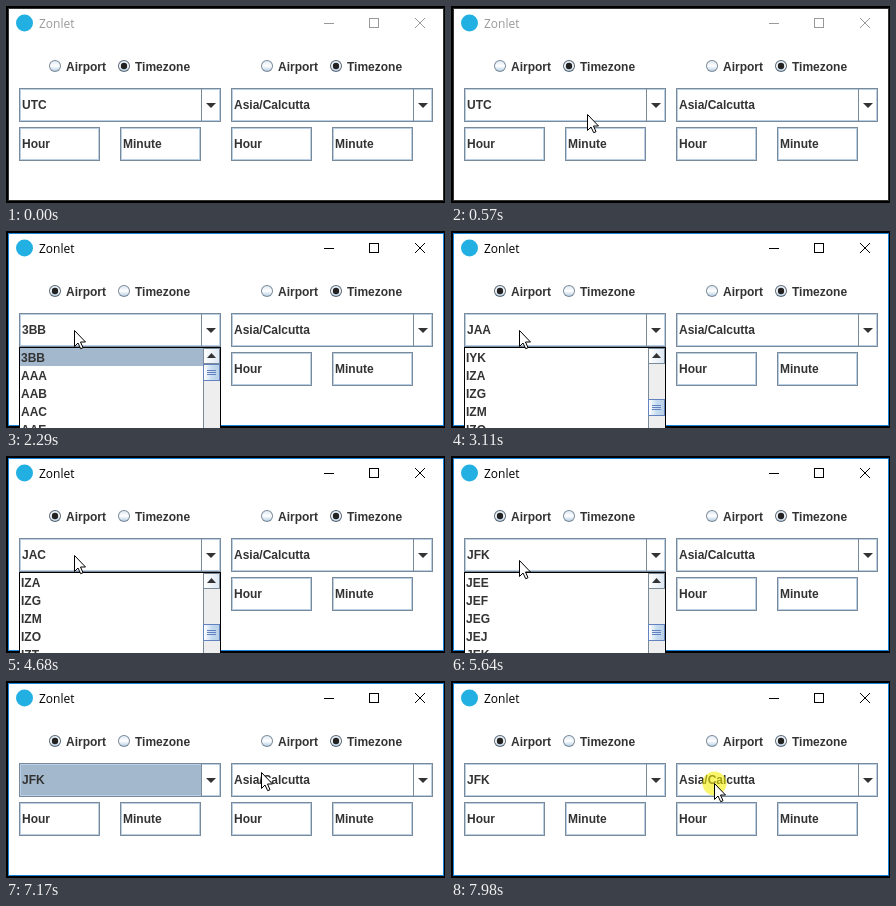
Recreate the animation shown at these times as an HTML page with a canvas. Size 439 px wide and 197 px high, loop 8000 ms.

```html
<!DOCTYPE html>
<html lang="en">
<head>
<meta charset="utf-8">
<title>Zonlet</title>
<style>
html, body { margin: 0; width: 100%; height: 100%; overflow: hidden; background: #000; }
canvas { display: block; }
</style>
</head>
<body>
<canvas id="stage" width="439" height="197"></canvas>
<script>
const ctx = document.getElementById('stage').getContext('2d');
const LOOP = 8000;
const INK = '#333', EDGE = '#7a8a99', PALE = '#b8cfe5', PICK = '#a3b8cc';
const BOLD = 'bold 12px "Liberation Sans", Arial, sans-serif';

// Pointer path: time, x, y
const PATH = [
  [140, 264, 190], [880, 59, 59], [1320, 59, 59], [1520, 68, 99],
  [5610, 68, 99], [5860, 76, 216], [6990, 85, 216], [7000, 89, 197],
  [7170, 255, 91], [7310, 263, 88], [7520, 263, 88], [7730, 263, 102]
];
const CLICKS = [[990, 1110], [2220, 2285], [7980, LOOP]];

// Left combo: start time, value, first visible list rows
const STATES = [
  [0, 'UTC', ''],
  [1080, '3BB', '3BB AAA AAB AAC AAE'],
  [3030, 'JAA', 'IYK IZA IZG IZM IZO'],
  [4680, 'JAC', 'IZA IZG IZM IZO IZT'],
  [4760, 'JFK', 'JEE JEF JEG JEJ JEK']
];

function rect(x, y, w, h, color) {
  ctx.fillStyle = color;
  ctx.fillRect(x, y, w, h);
}

function frame(x, y, w, h, color) {
  ctx.strokeStyle = color;
  ctx.lineWidth = 1;
  ctx.strokeRect(x + .5, y + .5, w - 1, h - 1);
}

function disc(x, y, r, color) {
  ctx.fillStyle = color;
  ctx.beginPath();
  ctx.arc(x, y, r, 0, 7);
  ctx.fill();
}

function shape(points, color) {
  ctx.fillStyle = color;
  ctx.beginPath();
  points.forEach(([x, y]) => ctx.lineTo(x, y));
  ctx.closePath();
  ctx.fill();
}

function text(s, x, y, color = INK, font = BOLD) {
  ctx.font = font;
  ctx.fillStyle = color;
  ctx.fillText(s, x, y);
}

function gradient(x0, y0, x1, y1, ...colors) {
  const g = ctx.createLinearGradient(x0, y0, x1, y1);
  colors.forEach((c, i) => g.addColorStop(i / (colors.length - 1), c));
  return g;
}

function pointerAt(t) {
  let i = PATH.findIndex(k => k[0] > t);
  if (i < 0) return PATH[PATH.length - 1].slice(1);
  if (i === 0) return [264, 220];
  const [t0, x0, y0] = PATH[i - 1], [t1, x1, y1] = PATH[i];
  const u = (t - t0) / (t1 - t0), e = u * u * (3 - 2 * u);
  return [x0 + (x1 - x0) * e, y0 + (y1 - y0) * e];
}

function chrome(active) {
  rect(0, 0, 439, 197, '#000');
  rect(2, 2, 436, 193, '#fff');
  frame(2, 2, 436, 193, active ? '#1883d7' : '#333');
  disc(18.5, 17, 8.5, '#22b0e3');
  const color = active ? '#000' : '#999';
  text('Zonlet', 33, 22, color, '12px "Open Sans", sans-serif');
  rect(318, 17, 10, 1, color);
  frame(363, 12, 10, 10, color);
  ctx.beginPath();
  ctx.moveTo(409, 12);
  ctx.lineTo(419, 22);
  ctx.moveTo(419, 12);
  ctx.lineTo(409, 22);
  ctx.stroke();
}

function radio(x, label, on, hover) {
  disc(x + 6, 60, 6, on ? '#5b6875' : EDGE);
  disc(x + 6, 60, 5, gradient(x, 55, x, 65, '#dde8f3', '#fff', PALE));
  if (hover) {
    ctx.strokeStyle = PALE;
    ctx.lineWidth = 1.5;
    ctx.beginPath();
    ctx.arc(x + 6, 60, 4.3, 0, 7);
    ctx.stroke();
  }
  if (on) disc(x + 6, 60, 3.2, '#222');
  text(label, x + 17, 65);
}

function box(x, y, w, h) {
  rect(x, y, w, h, '#fff');
  frame(x + 1, y + 1, w - 2, h - 2, PALE);
  frame(x, y, w, h, EDGE);
}

function combo(x, value, focused) {
  box(x, 82, 202, 34);
  if (focused) rect(x + 2, 84, 180, 30, PICK);
  rect(x + 182, 83, 1, 32, EDGE);
  shape([[x + 187, 97], [x + 197, 97], [x + 192, 102]], INK);
  text(value, x + 3, 103);
}

function panel(x, airport, value, focused, hover) {
  radio(x + 30, 'Airport', airport, hover);
  radio(x + 99, 'Timezone', !airport);
  combo(x, value, focused);
  ['Hour', 'Minute'].forEach((label, i) => {
    box(x + i * 101, 121, 81, 34);
    text(label, x + 3 + i * 101, 142);
  });
}

function popup(rows, picked, thumbY) {
  rect(13, 116, 202, 81, '#000');
  rect(14, 117, 200, 80, '#fff');
  rows.forEach((row, i) => {
    if (i === picked) rect(14, 117 + i * 18, 183, 18, PICK);
    text(row, 15, 131 + i * 18);
  });
  rect(197, 117, 17, 80, '#eee');
  rect(197, 117, 1, 80, EDGE);
  rect(198, 117, 15, 16, gradient(198, 0, 213, 0, '#fff', '#dde8f3'));
  frame(197, 117, 17, 16, EDGE);
  shape([[201, 127], [205.5, 122], [210, 127]], INK);
  rect(198, thumbY, 15, 17, gradient(198, 0, 213, 0, '#fff', '#c8ddf2', PALE));
  frame(197, thumbY, 17, 17, '#6382bf');
  for (let y = thumbY + 6; y < thumbY + 12; y += 2) rect(201, y, 9, 1, '#6382bf');
}

function pointer(x, y) {
  const points = [[.5, .5], [.5, 16.5], [4, 13], [6.7, 18.7], [9, 17.7], [6.5, 12], [11.5, 12]];
  ctx.save();
  ctx.translate(Math.round(x), Math.round(y));
  shape(points, '#fff');
  ctx.strokeStyle = '#000';
  ctx.lineWidth = 1;
  ctx.stroke();
  ctx.restore();
}

function draw(t) {
  const [, value, list] = STATES.filter(s => s[0] <= t).pop();
  const [x, y] = pointerAt(t);
  const airport = t >= 1080;
  const hover = x > 40 && x < 102 && y > 51 && y < 69;

  chrome(t >= 990);
  panel(13, airport, value, t >= 6640 && t < 7980, hover);
  panel(225, false, 'Asia/Calcutta');
  if (airport && t < 2250) frame(59, 51, 41, 18, PICK);

  if (t >= 2250 && t < 6640) {
    const picked = t < 3030 ? 0 : t > 5610 ? Math.floor((y - 117) / 18) : -1;
    popup(list.split(' '), picked, t < 3030 ? 133 : 168);
  }
  if (CLICKS.some(([a, b]) => t >= a && t < b)) disc(x + .5, y + .5, 12, 'rgba(244,238,0,.58)');
  pointer(x, y);
}

function tick(now) {
  draw(now % LOOP);
  requestAnimationFrame(tick);
}
draw(0);
requestAnimationFrame(tick);
</script>
</body>
</html>
```
